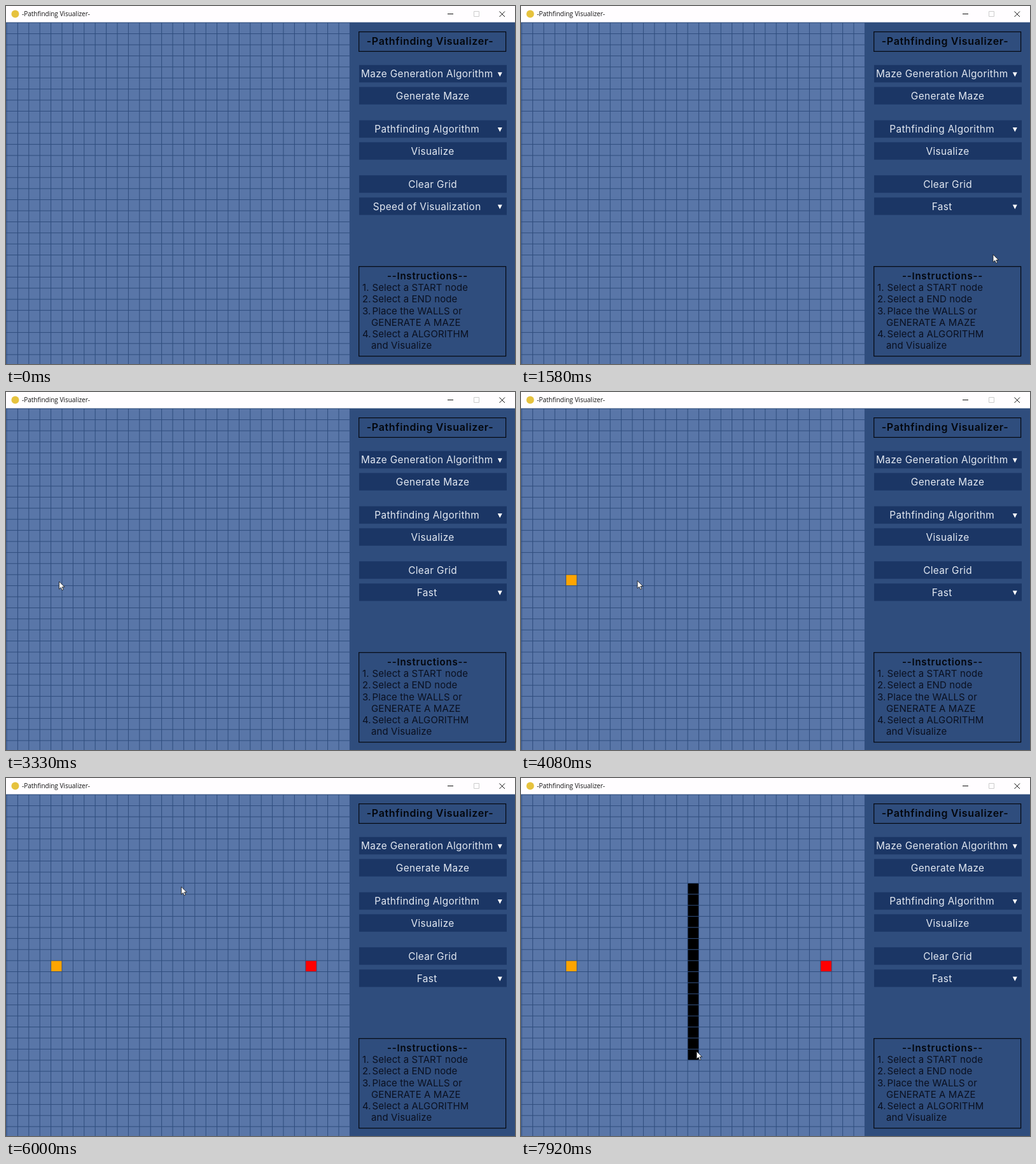
Write an HTML page that moves like this. It is 800x563 px and loops after 8 s.

```html
<!DOCTYPE html>
<html lang="en">
<head>
<meta charset="utf-8">
<title>Pathfinding Visualizer</title>
<style>
  html, body { margin: 0; width: 100%; height: 100%; overflow: hidden; background: #2f4d7d; }
  svg { display: block; width: 100vw; height: 100vh; }
  text { font-family: Inter, sans-serif; white-space: pre; }
  .label { font-size: 15.4px; letter-spacing: .35px; fill: #e3e9f2; text-anchor: middle; }
  .note { font-size: 15px; letter-spacing: .1px; fill: #0a1020; }
  .head { font-weight: 600; fill: #03060c; text-anchor: middle; }
  .caption { font: 10px "Open Sans", sans-serif; fill: #111; }
  .frame { fill: none; stroke: #05080f; stroke-width: 1.2; }
</style>
</head>
<body>
<svg id="stage" viewBox="0 0 800 563" preserveAspectRatio="none"></svg>
<script>
const LOOP = 8000, STEP = LOOP / 96;
const CELL = 17.4, LEFT = 1, TOP = 26, COLS = 31, ROWS = 31;
const BUTTON = '#1b3665', LINE = '#2f4d7d';
const stage = document.getElementById('stage');

function add(tag, attrs, content = '', parent = stage) {
  const node = document.createElementNS('http://www.w3.org/2000/svg', tag);
  for (const key in attrs) node.setAttribute(key, attrs[key]);
  node.textContent = content;
  parent.append(node);
  return node;
}
const rect = (x, y, width, height, fill, parent) =>
  add('rect', { x, y, width, height, fill }, '', parent);
const text = (x, y, cls, content, parent) => add('text', { x, y, class: cls }, content, parent);
const path = (d, attrs) => add('path', { d, ...attrs });
const show = (node, on) => node.setAttribute('visibility', on ? 'visible' : 'hidden');
const cell = (col, row, fill) =>
  rect(LEFT + col * CELL, TOP + row * CELL, CELL, CELL, fill);

// Grid
rect(0, 0, 800, 563, '#2f4d7d');
rect(0, TOP, 540.4, 537, '#5976a8');
const startNode = cell(4, 15, '#ffa500');
const endNode = cell(27, 15, '#ff0000');
const walls = Array.from({ length: 16 }, (_, i) => cell(15, 8 + i, '#000'));
let lines = '';
for (let i = 0; i <= COLS; i++) lines += `M${LEFT + i * CELL} ${TOP}V563`;
for (let i = 0; i < ROWS; i++) lines += `M0 ${TOP + i * CELL + .2}H540.4`;
path(lines, { stroke: LINE, 'stroke-width': 1, fill: 'none' });

// Window bar
rect(0, 0, 800, 25.6, '#fffdff');
add('circle', { cx: 14.5, cy: 12.5, r: 6, fill: '#e6c23e' });
text(25, 16, 'caption', '-Pathfinding Visualizer-');
path('M694 12.5H703M775.5 8.5L784 17M784 8.5L775.5 17', { stroke: '#111', fill: 'none' });
path('M735.5 8.5H743.5V16.5H735.5Z', { stroke: '#ccc', fill: 'none' });

// Side panel
add('rect', { x: 554.7, y: 40.6, width: 230.9, height: 30.8, class: 'frame' });
add('text', { x: 666.5, y: 61, class: 'head', 'font-size': 16, 'letter-spacing': .65 },
  '-Pathfinding Visualizer-');

function button(y, label, dropdown) {
  rect(555, y, 232, 27.4, BUTTON);
  if (dropdown) path(`M772.8 ${y + 11.4}h7l-3.5 7z`, { fill: '#fff' });
  return text(dropdown ? 661.7 : 670.6, y + 19.3, 'label', label);
}
button(92.8, 'Maze Generation Algorithm', true);
button(127.4, 'Generate Maze');
button(179.7, 'Pathfinding Algorithm', true);
button(214.3, 'Visualize');
button(266.3, 'Clear Grid');
const speed = button(301.2, 'Speed of Visualization', true);

add('rect', { x: 554.7, y: 409.7, width: 230.9, height: 141, class: 'frame' });
add('text', { x: 662.5, y: 430, class: 'head', 'font-size': 15, 'letter-spacing': .8 },
  '--Instructions--');
[
  ['1.', 'Select a START node'],
  ['2.', 'Select a END node'],
  ['3.', 'Place the WALLS or'],
  ['', 'GENERATE A MAZE'],
  ['4.', 'Select a ALGORITHM'],
  ['', 'and Visualize'],
].forEach(([number, line], i) => {
  const y = 448.2 + i * 18.25;
  text(560, y, 'note', number);
  text(number ? 575.5 : 574, y, 'note', line);
});

// Speed menu
const menu = add('g', {});
const options = ['Slow', 'Average', 'Fast'].map((name, i) => {
  const y = 329 + i * 26;
  const box = rect(555, y, 213.5, 26, BUTTON, menu);
  text(661.7, y + 19.2, 'label', name, menu);
  return box;
});
add('rect', { x: 554.5, y: 328.5, width: 214, height: 79, fill: 'none', stroke: '#5b6470' }, '', menu);

const cursor = path('M0 0V12L2.8 9.4L4.7 13.7L6.7 12.8L4.8 8.7H8.6Z',
  { fill: '#fff', stroke: '#111', 'stroke-width': .8 });

// time, x, y of the pointer, and the easing power used to reach it
const track = [
  [250, 799, 300], [500, 765, 316], [620, 764, 318], [830, 755, 364],
  [1080, 752, 390], [1500, 751, 391], [2250, 489, 385], [2400, 489, 385],
  [3250, 83.5, 298], [3800, 83.5, 298], [4670, 483, 293], [5170, 483, 293],
  [5950, 275.5, 171], [6580, 275.5, 171], [7500, 275, 312, 1.5], [7917, 276, 430, 1],
];
const times = { appear: 250, open: 560, pick: 1410, start: 3580, end: 4990, wall: 6500 };
const smooth = u => u * u * (3 - 2 * u);

function pointer(t) {
  const i = track.findIndex(key => key[0] >= t);
  if (i < 0) return track.at(-1).slice(1, 3);
  if (i === 0) return track[0].slice(1, 3);
  const [t0, x0, y0] = track[i - 1], [t1, x1, y1, power] = track[i];
  const u = (t - t0) / (t1 - t0);
  const k = power ? u ** power : smooth(u);
  return [x0 + (x1 - x0) * k, y0 + (y1 - y0) * k];
}

function draw(now) {
  const t = Math.floor((now % LOOP + 4) / STEP) % 96 * STEP;
  const [x, y] = pointer(t);
  cursor.setAttribute('transform', `translate(${x.toFixed(1)} ${y.toFixed(1)})`);
  show(cursor, t >= times.appear);
  show(menu, t >= times.open && t < times.pick);
  options.forEach((box, i) =>
    box.setAttribute('fill', Math.floor((y - 329) / 26) === i ? '#000' : BUTTON));
  speed.textContent = t >= times.pick ? 'Fast' : 'Speed of Visualization';
  show(startNode, t >= times.start);
  show(endNode, t >= times.end);
  const row = Math.floor((y - TOP) / CELL);
  walls.forEach((wall, i) => show(wall, t >= times.wall && 8 + i <= row));
}

const begin = performance.now();
function tick() {
  draw(performance.now() - begin);
  requestAnimationFrame(tick);
}
tick();
</script>
</body>
</html>
```
